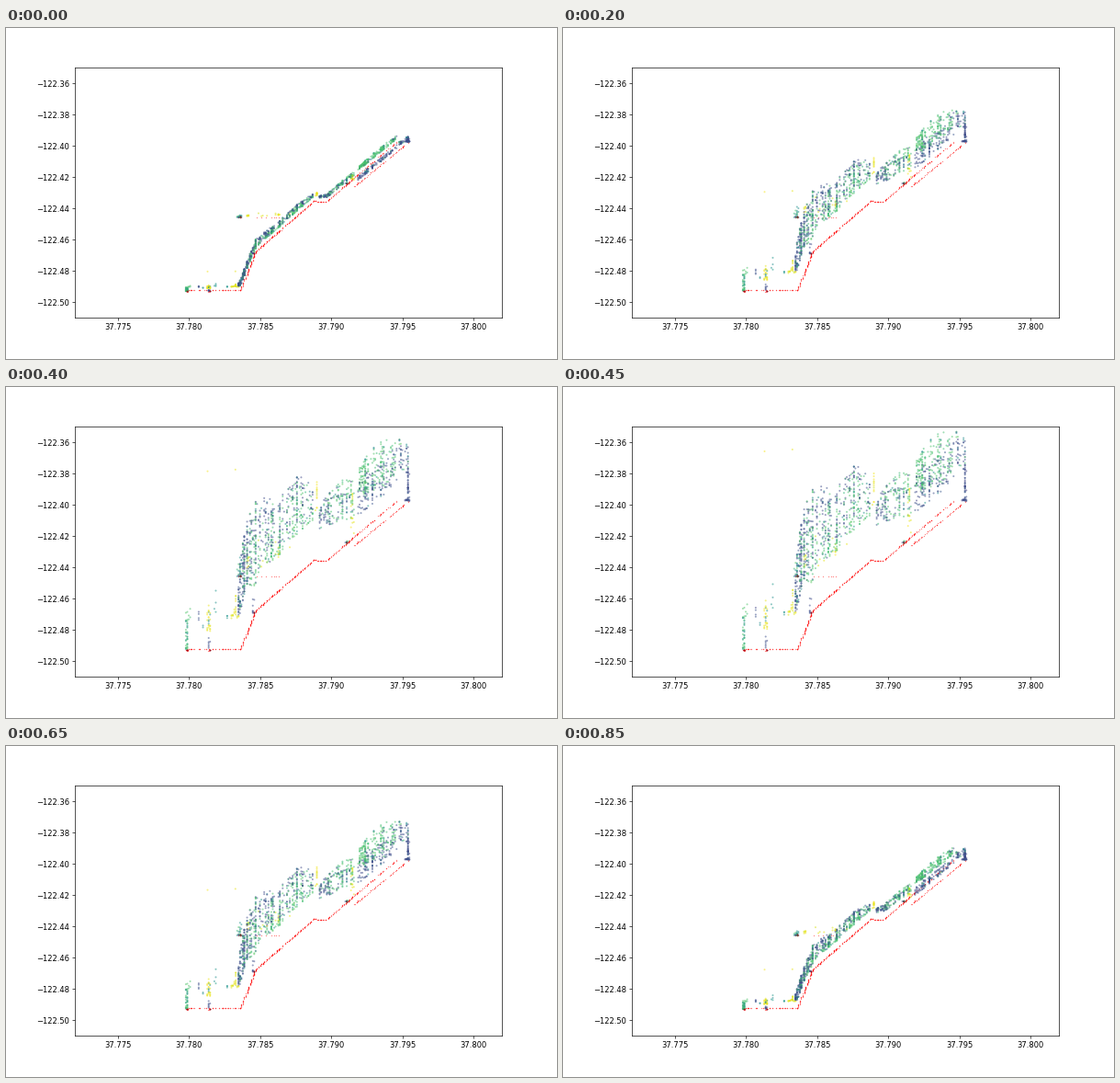
These frames come from a looping animation (600 by 360 pixels, 0.9 s). A matplotlib script:

```python
import numpy as np
import matplotlib.pyplot as plt
from matplotlib.animation import FuncAnimation

FRAMES, INTERVAL, PEAK = 18, 50, 10
GRID = 1.55  # stage pixels per 0.0001 degree
rng = np.random.default_rng(38)
plt.rcParams["font.family"] = "DejaVu Sans"

DARK, TEAL, GREEN, YELLOW = 0.24, 0.5, 0.71, 0.96

# Route lines in stage pixels
UPPER = [(196, 285.5), (255.5, 285), (272, 243), (335, 188.5),
         (349, 189), (379, 163), (426, 123.5)]
LOWER = [(379, 172.5), (438.5, 124)]
SPUR = [(252, 206), (312, 206)]


def along(points, x):
    return np.interp(x, *zip(*points))


def to_data(x, y):
    return np.column_stack([37.772 + (x - 75) / 15500,
                            -122.35 - (y - 43.2) / 1700])


def snap(x):
    return np.round((x - 75) / GRID) * GRID + 75


xs, bases, rises, tones = [], [], [], []


def add(x, base, peak, tone):
    """Store points by their base and their height at full stretch."""
    x = np.asarray(x, float)
    xs.append(x)
    bases.append(np.broadcast_to(base, x.shape))
    rises.append((base - np.broadcast_to(peak, x.shape)) / PEAK)
    tones.append(np.broadcast_to(tone, x.shape) + rng.normal(0, 0.02, x.shape))


def band(n, x0, x1, line, top, bottom, dark):
    """Cloud between two curves; dark(u, t) is the chance of a dark point."""
    cols = np.unique(snap(np.arange(x0, x1, GRID)))
    weight = rng.exponential(1, cols.size) + 0.25
    x = rng.choice(cols, n, p=weight / weight.sum())
    reach = dict(zip(cols, rng.uniform(0.78, 1, cols.size)))
    u = rng.random(n) * [reach[c] for c in x]
    low, high = along(bottom, x), along(top, x)
    chance = dark(u, (x - x0) / (x1 - x0))
    tone = np.where(rng.random(n) < chance, DARK, GREEN)
    tone = np.where(rng.random(n) < 0.07, TEAL, tone)
    add(x, along(line, x), low + (high - low) * u, tone)


def stack(n, x0, x1, base, top, bottom, tone, skew=1.0):
    """Narrow column of points, denser near the bottom for skew > 1."""
    x = snap(rng.uniform(x0, x1, n))
    add(x, base, bottom + (top - bottom) * rng.random(n) ** skew, tone)


# Main clouds from west to east
band(300, 253, 272, UPPER,
     [(253, 200), (256, 165), (260, 143), (265, 123), (272, 103)],
     [(253, 250), (262, 212), (272, 212)],
     lambda u, t: 0.72 - 0.35 * t + 0.2 * u)
band(400, 271, 335, UPPER,
     [(271, 103), (281, 103), (287, 108), (294, 94), (300, 102),
      (308, 88), (317, 72), (322, 80), (335, 100)],
     [(271, 213), (280, 193), (300, 177), (310, 162), (335, 140)],
     lambda u, t: 0.08 + 0.85 * u)
band(185, 342, 380, UPPER,
     [(342, 120), (350, 103), (360, 94), (368, 80), (380, 88)],
     [(342, 150), (360, 143), (380, 140)],
     lambda u, t: 0.65 - 0.6 * t)
band(215, 383, 426, UPPER,
     [(383, 76), (395, 62), (414, 41), (426, 48)],
     [(383, 118), (400, 112), (426, 93)],
     lambda u, t: 0.1 + 0 * u)
band(130, 384, 426, LOWER,
     [(384, 92), (426, 55)], [(384, 136), (426, 102)],
     lambda u, t: 0.93 + 0 * u)
band(42, 428, 438, LOWER,
     [(428, 46), (438, 52)], [(428, 82), (438, 92)],
     lambda u, t: 0.85 + 0 * u)

# Eastern terminal
stack(42, 437, 438.5, 124, 70, 124, DARK, 1.3)
stack(14, 435, 440, 123.5, 122, 124, DARK)

# Western terminal and the flat stretch
stack(24, 196, 198, 286.5, 238, 286, GREEN, 1.4)
stack(14, 196, 198, 286.5, 245, 286, TEAL, 1.4)
stack(4, 199, 201, 285.5, 234, 252, GREEN)
stack(4, 209, 211, 285.5, 240, 263, DARK)
stack(2, 213, 215, 285.5, 255, 259, TEAL)
stack(11, 219, 223, 285.5, 256, 264, YELLOW)
stack(10, 219, 222, 285.5, 218, 252, YELLOW)
stack(7, 220, 222, 286.5, 268, 286, DARK)
stack(5, 219, 223, 285.5, 236, 266, TEAL)
stack(4, 227, 229, 285.5, 210, 258, TEAL)
stack(3, 240, 244, 285.5, 244, 248, TEAL)
stack(13, 245, 253, 285.5, 239, 249, YELLOW)
stack(9, 249, 251, 285.5, 220, 243, YELLOW)
add([219.5, 249.8], 286.7, np.array([70, 68]), YELLOW)

# Spur, and the yellow stops along the route
stack(10, 252, 256, 206, 180, 206, TEAL, 1.6)
stack(8, 252, 256, 206, 190, 207, GREEN, 1.6)
stack(8, 261, 312, 206, 162, 200, YELLOW)
stack(6, 262, 265, 206, 180, 197, YELLOW)
stack(6, 294, 298, 206, 174, 183, YELLOW)
stack(13, 337.5, 339, 188.5, 92, 136, YELLOW)
stack(15, 375.5, 378.5, 166, 110, 160, YELLOW)

# Points that hardly leave the line
stack(5, 268, 271, 245, 243, 246, DARK)
stack(3, 268, 271, 240, 221, 238, DARK)
stack(5, 370, 372, 169, 167, 170, GREEN)
stack(3, 370, 372, 169, 168, 170, DARK)
stack(3, 253, 256, 206, 204, 206, DARK)

x, base, rise, tone = map(np.concatenate, (xs, bases, rises, tones))
order = rng.permutation(x.size)
x, base, rise, tone = (a[order] for a in (x, base, rise, tone))

# Fixed red trace
red = []


def trace(n, line, x0, x1):
    t = rng.uniform(x0, x1, n)
    red.append(np.column_stack([snap(t), along(line, t)]))


trace(45, UPPER, 196, 254)
trace(90, UPPER, 254.5, 272)
trace(150, UPPER, 272, 337)
trace(16, UPPER, 337, 350)
trace(60, UPPER, 350, 379)
trace(55, UPPER, 379, 426)
trace(62, LOWER, 379, 438.5)
trace(9, SPUR, 253, 256)
trace(7, SPUR, 257, 300)
red.append(np.column_stack([rng.uniform(196, 198, 9), rng.uniform(285.5, 287, 9)]))
red.append(np.column_stack([rng.uniform(220, 223, 5), rng.uniform(286, 288, 5)]))
red = np.concatenate(red)

fig = plt.figure(figsize=(10, 6), dpi=60, facecolor="white")
ax = fig.add_axes([0.125, 0.125, 0.775, 0.755])
ax.set_xlim(37.772, 37.802)
ax.set_ylim(-122.51, -122.35)
ax.set_xticks(np.arange(37.775, 37.801, 0.005))
ax.set_yticks(np.arange(-122.50, -122.355, 0.02))
ax.xaxis.set_major_formatter("{x:.3f}")
ax.yaxis.set_major_formatter(lambda v, _: f"{v:.2f}".replace("-", "\u2212"))
ax.tick_params(labelsize=10)

ax.scatter(*to_data(red[:, 0], red[:, 1]).T, s=2.6, c="red", alpha=0.45,
           linewidths=0)
dots = ax.scatter(*to_data(x, base).T, s=6, c=plt.cm.viridis(tone), alpha=0.52,
                  linewidths=0)
# Dark knots at the busiest stops
knots = np.array([(197, 286.5), (221.5, 286.5), (255, 205.5), (269.5, 245), (371, 169)])
ax.scatter(*to_data(knots[:, 0], knots[:, 1]).T, s=6, c="#8a0010", alpha=0.8,
           linewidths=0)


def update(i):
    stretch = PEAK - abs(FRAMES // 2 - i)
    dots.set_offsets(to_data(x, base - stretch * rise))
    return (dots,)


anim = FuncAnimation(fig, update, frames=FRAMES, interval=INTERVAL,
                     repeat=True, repeat_delay=0)
plt.show()
```
